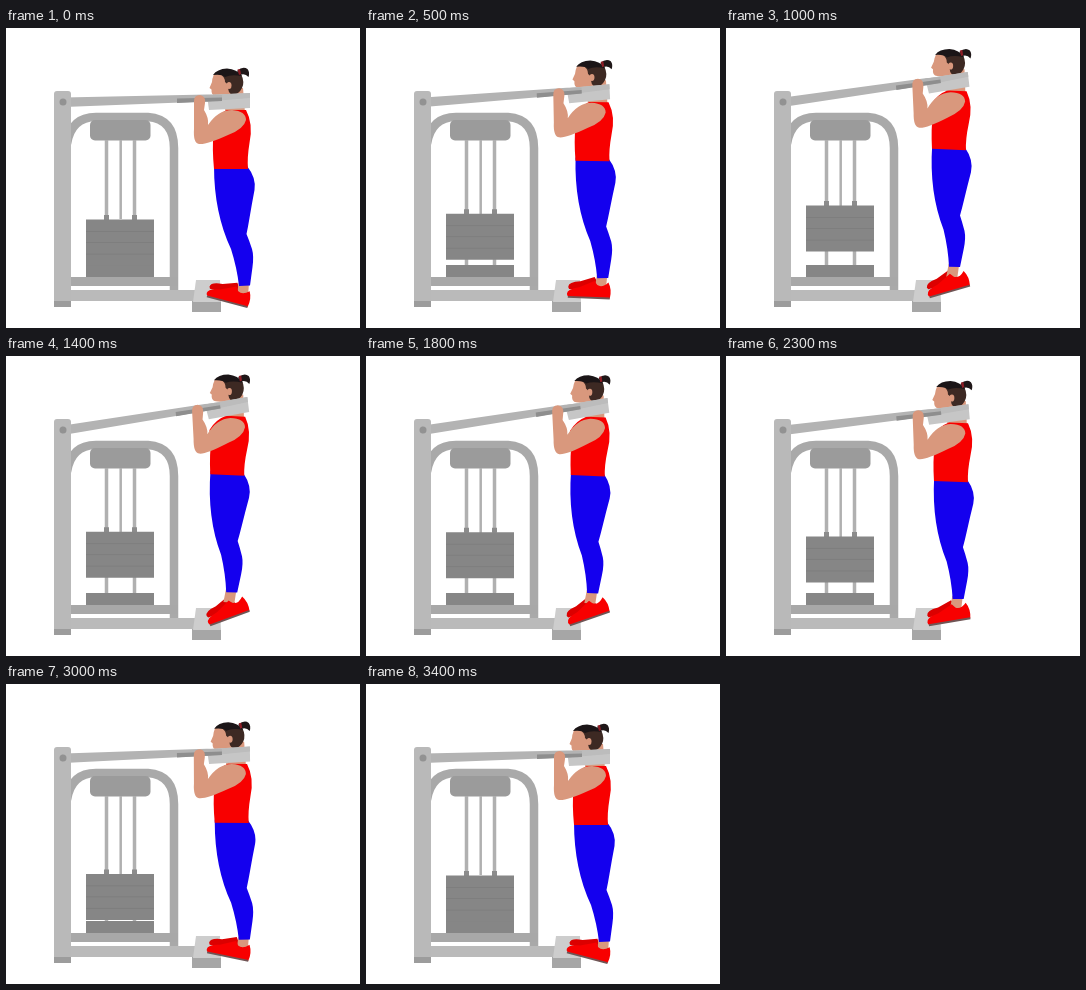
Animation of 354x300 px, one loop 3500 ms. Source, as an HTML page without scripts:

```html
<!DOCTYPE html>
<html lang="en">
<head>
<meta charset="utf-8">
<title>Standing calf raise</title>
<style>
  /* lift: how far the hips have risen, in px */
  @property --lift { syntax: "<number>"; inherits: true; initial-value: 0; }

  html, body { margin: 0; width: 100%; height: 100%; overflow: hidden; background: #fff; }
  svg { display: block; width: 354px; height: 300px; animation: lift 3.5s infinite; }

  @keyframes lift {
    0%      { --lift: 0;    animation-timing-function: steps(2); }
    5.714%  { --lift: 1.5;  animation-timing-function: steps(3); }
    14.285% { --lift: 8;    animation-timing-function: steps(4); }
    25.714% { --lift: 18;   animation-timing-function: steps(2); }
    31.428% { --lift: 20.8; animation-timing-function: steps(3); }
    40%     { --lift: 22;   animation-timing-function: steps(4); }
    51.428% { --lift: 21.2; animation-timing-function: steps(3); }
    60%     { --lift: 18.5; animation-timing-function: steps(3); }
    68.571% { --lift: 13.8; animation-timing-function: steps(4); }
    80%     { --lift: 5.6;  animation-timing-function: steps(2); }
    85.714% { --lift: 2.2;  animation-timing-function: steps(2); }
    91.428% { --lift: .5;   animation-timing-function: steps(2); }
    97.142%, 100% { --lift: 0; }
  }

  .body {
    transform: translate(calc((.39 - .0254 * var(--lift)) * var(--lift) * 1px), calc(var(--lift) * -1px));
  }
  .torso, .legs { transform-origin: 225px 140px; }
  .torso { transform: rotate(calc(var(--lift) * .13deg)); }
  .legs  { transform: rotate(calc(var(--lift) * .2deg)); }
  .shoes {
    transform-origin: 208px 264px;
    transform: translateY(calc(1px - var(--lift) * .11px)) rotate(calc(15deg - var(--lift) * 1.6deg));
  }
  .arm {
    transform-origin: 192px 72px;
    transform: translate(calc(var(--lift) * -.09px), calc(var(--lift) * -.83px)) rotate(calc(var(--lift) * -.14deg));
  }
  .lever {
    transform-origin: 57px 74px;
    transform: rotate(calc(var(--lift) * -.335deg));
  }
  .weight { transform: translateY(calc(var(--lift) * -.72px)); }

  .skin { fill: #d9987d; }
  .red  { fill: #f80000; }
  .blue { fill: #1400ee; }
</style>
</head>
<body>
<svg viewBox="0 0 354 300">
  <!-- machine frame -->
  <path d="M61 116Q65 89 90 89H142Q168 91 168 120V262" fill="none" stroke="#a9a9a9" stroke-width="8.5"/>
  <rect x="84" y="92" width="60.500" height="20.500" rx="5" fill="#9b9b9b"/>
  <path d="M100.500 112V238M128.500 112V238" stroke="#b0b0b0" stroke-width="3.500"/>
  <path d="M114.700 112V191" stroke="#b0b0b0" stroke-width="2.500"/>
  <path d="M65 249H172V258H65Z" fill="#a8a8a8"/>
  <path d="M80 237H148V249H80Z" fill="#868686"/>
  <g class="weight">
    <path d="M98 187H103V192H98ZM126 187H131V192H126Z" fill="#8c8c8c"/>
    <path d="M80 191.500H148V237.500H80Z" fill="#868686"/>
    <path d="M80 203.500H148M80 214.500H148M80 226H148" stroke="#7e7e7e"/>
  </g>
  <path d="M65 262H190V273H65Z" fill="#bababa"/>
  <path d="M186 273H215V284H186Z" fill="#a6a6a6"/>
  <path d="M190 252H214L215 274H187Z" fill="#cdcdcd"/>

  <!-- lower body -->
  <g class="shoes">
    <path d="M202 259Q202 254 214 253L228 248L236 261H203Z" fill="#dc0000"/>
  </g>
  <g class="body">
    <g class="legs">
      <path class="skin" d="M232.500 255H243L242 268H231Z"/>
      <path class="blue" d="M208 138H241Q250.500 150 248.500 162Q246 175 243.500 190Q242 199 240.500 206Q243 212 246 221Q248 228 246.500 239L244 257.500L233 258Q231 240 225 221Q208 185 208 138Z"/>
    </g>
  </g>
  <g class="shoes">
    <path class="red" d="M201 266Q201 261 213 259L228 252L231 256Q236 259 242 253Q246 260 244 269H203Q201 268 201 266Z"/>
    <path d="M202 269H244" stroke="#6f5555" stroke-width="1.800"/>
  </g>

  <!-- upper body -->
  <g class="body">
    <g class="torso">
      <path class="skin" d="M220 60H237L239 85H219Z"/>
      <path class="red" d="M221 82H240Q247.500 96 243.500 115Q241 130 242 141H208Q206 120 207.500 107L205 97Q211 86 221 82Z"/>
      <path class="skin" d="M208 46Q206 51 206 54L203.500 60L205.500 61.500Q205 68 210 68L225 69L233 61L229 46Z"/>
      <path d="M214 46Q225 42 235 46Q239 54 236 60Q233 66 227 67Q221 65 222.500 57L219 54Q219 49 214 46Z" fill="#3d2923"/>
      <path d="M207 47Q211 41 221 40.500Q231 41 236 48Q225 46 219 49Q216 46 207 47Z" fill="#1b1517"/>
      <path d="M231 43Q237 37.500 241.500 41Q244 44 242.500 49Q239 45 234 47Z" fill="#1f1718"/>
      <path d="M231.500 41.500L234 41L235 46L233 47Z" fill="#8d1d26"/>
      <ellipse class="skin" cx="223" cy="57.500" rx="2.500" ry="3.500"/>
    </g>
  </g>

  <!-- lever with shoulder pad -->
  <g class="lever">
    <path d="M201 67L244 65V80L203 82Z" fill="#c6c6c6"/>
    <path d="M201 67L244 65V70L201 73.500Z" fill="#bcbcbc"/>
    <path d="M58 69.500L201 66.500L216 67V73L201 73.500L58 79Z" fill="#b3b3b3"/>
    <path d="M171 70.500L216 69.500V73L171 75Z" fill="#8e8e8e"/>
  </g>
  <path d="M48 279V66Q48 63 51 63H62Q65 63 65 66V279Z" fill="#b9b9b9"/>
  <path d="M48 273H65V279H48Z" fill="#9c9c9c"/>
  <circle cx="57" cy="74" r="3.500" fill="#929292"/>

  <path class="arm skin" d="M188 73Q188 67 194 67Q200 68 199 75L198 82Q203 90 202 97Q212 82 226 82Q240 83 240 92Q238 101 222 107Q200 117 193 116Q187 115 188 101Z"/>
</svg>
</body>
</html>
```
